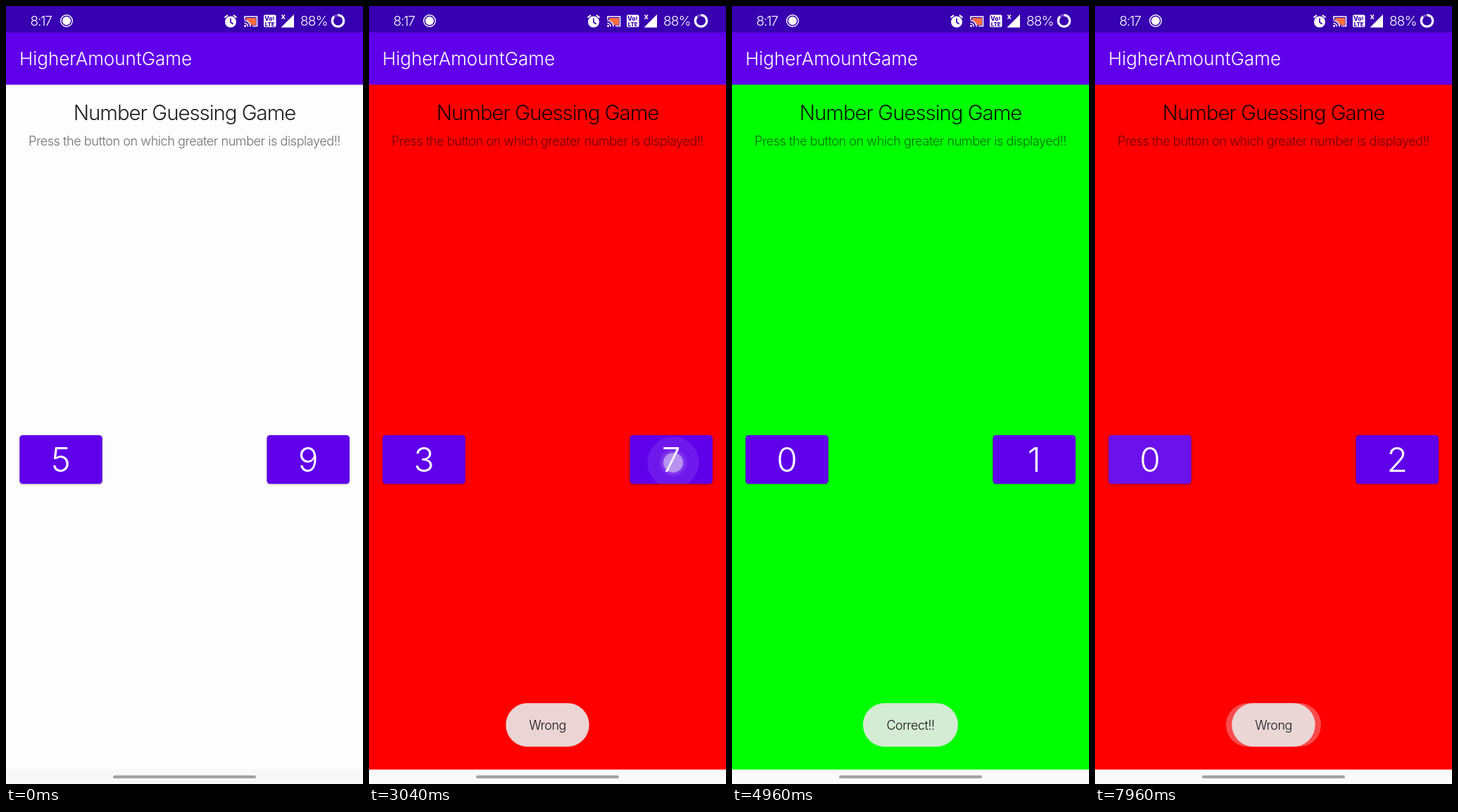
An HTML page with a canvas for the animation above (8000 ms loop, 507 px wide and 1104 px high).

```html
<!DOCTYPE html>
<html lang="en">
<head>
<meta charset="utf-8">
<title>Number Guessing Game</title>
<style>
html, body { margin: 0; width: 100%; height: 100%; overflow: hidden; background: #fdfdfd; }
canvas { display: block; width: 507px; height: 1104px; }
</style>
</head>
<body>
<canvas id="stage" width="507" height="1104"></canvas>
<script>
const LOOP = 8000, W = 507, H = 1104, MID = 253.5;
const PURPLE = '#6000ea', DARK = '#3700b0', RED = '#fe0000', GREEN = '#00ff00';
const FONT = 'Inter, Roboto, "Liberation Sans", sans-serif';
const ctx = document.getElementById('stage').getContext('2d');

// Game states, each valid from time t
const rounds = [
  { t: 0, bg: '#fdfdfd', left: 5, right: 9 },
  { t: 1600, bg: RED, left: 3, right: 7 },
  { t: 3160, bg: GREEN, left: 2, right: 8 },
  { t: 3780, bg: GREEN, left: 0, right: 1 },
  { t: 5550, bg: RED, left: 4, right: 2 },
  { t: 7110, bg: RED, left: 1, right: 2 },
  { t: 7855, bg: RED, left: 0, right: 2 }
];
const presses = [
  { side: 0, x: 63, y: 648, down: 1408, up: 1580 },
  { side: 1, x: 432, y: 648, down: 3012, up: 3130 },
  { side: 1, x: 430, y: 654, down: 3610, up: 3750 },
  { side: 0, x: 60, y: 657, down: 5310, up: 5555 },
  { side: 1, x: 426, y: 658, down: 6880, up: 7115 },
  { side: 0, x: 61, y: 656, down: 7630, up: 7855 }
];
// Toasts queue up one after the other
const TOAST_START = 1640, TOAST_TIME = 2080;
const toasts = ['Wrong', 'Correct!!', 'Correct!!', 'Wrong'];
const buttons = [{ x: 19.3, y: 609 }, { x: 370.5, y: 609 }];
const BW = 117.4, BH = 69;

const clamp = v => Math.max(0, Math.min(1, v));
const smooth = v => v * v * (3 - 2 * v);

function text(str, x, y, size, color, { align = 'center', weight = 300, gap = 0 } = {}) {
  ctx.font = `${weight} ${size}px ${FONT}`;
  ctx.letterSpacing = gap + 'px';
  ctx.textAlign = align;
  ctx.fillStyle = color;
  ctx.fillText(str, x, y);
}

function rect(x, y, w, h, color) {
  ctx.fillStyle = color;
  ctx.fillRect(x, y, w, h);
}

function round(x, y, w, h, r) {
  ctx.beginPath();
  ctx.roundRect(x, y, w, h, r);
}

function disc(x, y, r, color) {
  ctx.fillStyle = color;
  ctx.beginPath();
  ctx.arc(x, y, r, 0, Math.PI * 2);
  ctx.fill();
}

function arc(x, y, r, from, to, width, color) {
  ctx.strokeStyle = color;
  ctx.lineWidth = width;
  ctx.beginPath();
  ctx.arc(x, y, r, from, to);
  ctx.stroke();
}

function line(color, width, ...pts) {
  ctx.strokeStyle = color;
  ctx.lineWidth = width;
  ctx.beginPath();
  for (let i = 0; i < pts.length; i += 2) ctx.lineTo(pts[i], pts[i + 1]);
  ctx.stroke();
}

function shadow(color, blur, dy) {
  ctx.shadowColor = color;
  ctx.shadowBlur = blur;
  ctx.shadowOffsetY = dy;
}

function statusBar() {
  rect(0, 0, W, 37.5, DARK);
  text('8:17', 34.5, 28, 19, '#fff', { align: 'left', gap: -1.2 });
  arc(86, 21, 8.3, 0, 7, 1.4, '#fff');
  disc(86, 21, 6, '#fff');

  // alarm
  disc(319, 22.5, 8, '#fff');
  line('#fff', 2.2, 310.5, 16.5, 315, 13);
  line('#fff', 2.2, 327.5, 16.5, 323, 13);
  line(DARK, 1.7, 319, 17.5, 319, 23, 322.5, 25.5);

  // cast
  rect(341, 17, 14, 10, '#ff6e40');
  line('#fff', 1.6, 339, 19, 339, 15, 356.5, 15, 356.5, 28.5, 350, 28.5);
  ctx.fillStyle = DARK;
  ctx.beginPath();
  ctx.moveTo(338, 30);
  ctx.arc(338, 30, 10.5, -Math.PI / 2, 0);
  ctx.fill();
  for (const r of [5, 8.7]) arc(338.5, 29.3, r, -Math.PI / 2, 0, 1.5, '#fff');
  disc(339.6, 28.2, 1.5, '#fff');

  // network
  ctx.fillStyle = '#fff';
  round(366, 12.5, 17.5, 17.5, 2);
  ctx.fill();
  text('Vo', 373, 20.5, 8.5, DARK, { weight: 800 });
  arc(377.5, 17.5, 2.8, -0.9, 0.9, 1.2, DARK);
  text('LTE', 374.7, 28.8, 8, DARK, { weight: 800 });
  ctx.fillStyle = '#fff';
  ctx.beginPath();
  ctx.moveTo(409, 12);
  ctx.lineTo(409, 30.5);
  ctx.lineTo(390.5, 30.5);
  ctx.fill();
  line('#fff', 1.4, 391.5, 12.5, 396, 18.5);
  line('#fff', 1.4, 396, 12.5, 391.5, 18.5);

  // battery
  text('88%', 418, 28, 19, '#fff', { align: 'left', gap: -0.8 });
  const top = -Math.PI / 2, full = top + Math.PI * 2 * 0.88;
  arc(471.5, 21, 8.2, 0, 7, 3.2, 'rgba(255,255,255,.3)');
  arc(471.5, 21, 8.2, top, full, 3.2, '#fff');
}

function appBar() {
  ctx.save();
  shadow('rgba(0,0,0,.2)', 3, 0.5);
  rect(0, 37, W, 74.6, PURPLE);
  ctx.restore();
  text('HigherAmountGame', 19, 84, 26, '#fff', { align: 'left', weight: 350 });
}

function ripple(p, b, t) {
  const leave = Math.max(p.up, p.down + 225);
  const alpha = 0.24 * clamp((t - p.down) / 75) * (1 - clamp((t - leave) / 150));
  if (alpha <= 0) return;
  const k = smooth(clamp((t - p.down) / 225));
  const cx = p.x + (b.x + BW / 2 - p.x) * k;
  const cy = p.y + (b.y + BH / 2 - p.y) * k;
  disc(cx, cy, 35 + 34 * k, `rgba(255,255,255,${alpha})`);
}

function button(side, value, t) {
  const b = buttons[side];
  const mine = presses.filter(p => p.side === side);
  const lift = Math.max(...mine.map(p =>
    clamp((t - p.down) / 100) * (1 - clamp((t - p.up - 60) / 100))));
  ctx.save();
  shadow('rgba(0,0,0,.3)', 3 + 5 * lift, 1 + 2 * lift);
  ctx.fillStyle = PURPLE;
  round(b.x, b.y, BW, BH, 4.5);
  ctx.fill();
  ctx.restore();
  ctx.save();
  round(b.x, b.y, BW, BH, 4.5);
  ctx.clip();
  mine.forEach(p => ripple(p, b, t));
  ctx.restore();
  text(value, b.x + BW / 2, 661, 48, '#fff');
}

function touch(p, t) {
  const a = clamp((t - p.down + 20) / 30) * (1 - clamp((t - p.up) / 80));
  if (a <= 0) return;
  ctx.save();
  ctx.globalAlpha = a;
  const glow = ctx.createRadialGradient(p.x, p.y, 12, p.x, p.y, 21);
  glow.addColorStop(0, 'rgba(255,255,255,.2)');
  glow.addColorStop(1, 'rgba(255,255,255,0)');
  disc(p.x, p.y, 21, glow);
  disc(p.x, p.y, 14, 'rgba(228,222,240,.5)');
  ctx.restore();
}

function toast(label, i, t) {
  const age = t - TOAST_START - i * TOAST_TIME;
  const a = clamp(age / 84) * (1 - clamp((age - TOAST_TIME) / 125));
  if (a <= 0) return;
  const w = label === 'Wrong' ? 118.4 : 135;
  ctx.save();
  ctx.globalAlpha = a;
  ctx.fillStyle = 'rgba(234,234,234,.91)';
  round(MID - w / 2, 989.2, w, 61.8, 30.9);
  ctx.fill();
  text(label, MID, 1026.5, 18, '#141414', { gap: -0.5 });
  ctx.restore();
}

function draw(t) {
  const now = rounds.filter(r => r.t <= t).pop();
  rect(0, 0, W, H, now.bg);
  appBar();
  statusBar();
  text('Number Guessing Game', MID, 162, 29.4, 'rgba(0,0,0,.88)', { gap: -1.03 });
  text('Press the button on which greater number is displayed!!', MID, 198, 18.1,
    'rgba(0,0,0,.56)', { gap: -0.46 });
  button(0, now.left, t);
  button(1, now.right, t);
  presses.forEach(p => touch(p, t));
  rect(0, 1083.5, W, 21, t < rounds[1].t ? '#f8f8f9' : '#fafafa');
  toasts.forEach((label, i) => toast(label, i, t));
  ctx.fillStyle = '#a2a2a2';
  round(152, 1091.7, 203, 4.4, 2.2);
  ctx.fill();
}

const start = performance.now();
function tick() {
  draw((performance.now() - start) % LOOP);
  requestAnimationFrame(tick);
}
tick();
</script>
</body>
</html>
```
